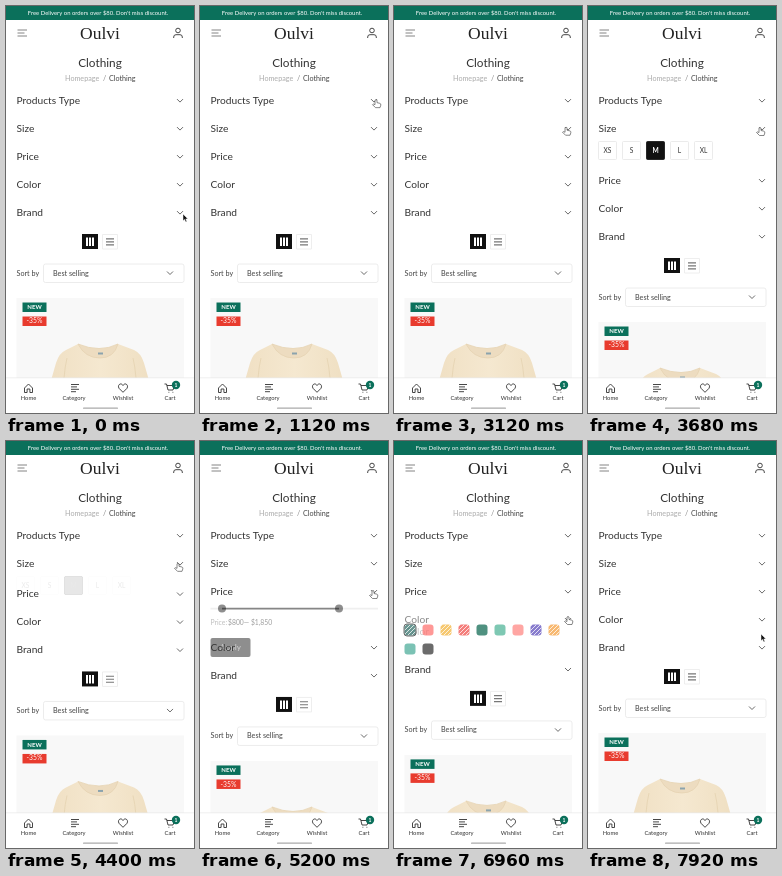
These frames come from a looping animation (188x407 px, 8000 ms). An HTML page with a canvas:

```html
<!DOCTYPE html>
<html lang="en">
<head>
<meta charset="utf-8">
<title>Shop filter</title>
<style>
html, body { margin: 0; width: 100%; height: 100%; overflow: hidden; background: #fff; }
canvas { display: block; width: 188px; height: 407px; }
</style>
</head>
<body>
<canvas id="stage"></canvas>
<script>
const LOOP = 8000, FADE = 400, W = 188, H = 407;
const GREEN = '#0b705b', INK = '#333', SANS = 'Lato, sans-serif';
const canvas = document.getElementById('stage');
const scale = window.devicePixelRatio || 1;
canvas.width = W * scale;
canvas.height = H * scale;
const c = canvas.getContext('2d');

const sections = [
  { name: 'Products Type', open: 1270, close: 2388, height: 113, draw: drawTypes },
  { name: 'Size', open: 3260, close: 4080, height: 24, draw: drawSizes },
  { name: 'Price', open: 5008, close: 5900, height: 59, draw: drawPrice },
  { name: 'Color', open: 6690, close: 7260, height: 29, draw: drawColors },
  { name: 'Brand' }
];
// time, x, y of the pointer
const pointerPath = [
  [0, 177, 208], [300, 177, 206], [1000, 176, 94], [1500, 176, 95], [2000, 175, 99],
  [2700, 175, 99], [3150, 172, 122], [4350, 172, 122], [4850, 173, 150],
  [6150, 173, 150], [6550, 174, 176], [7500, 174, 176], [7880, 173, 193], [8000, 173, 193]
];

const clamp = v => Math.max(0, Math.min(1, v));
const ease = v => { v = clamp(v); return v * v * (3 - 2 * v); };
const openness = (s, t) => s.open ? ease((t - s.open) / FADE) - ease((t - s.close) / FADE) : 0;

function text(str, x, y, size, color = INK, align = 'left', weight = 400, family = SANS) {
  c.font = `${weight} ${size}px ${family}`;
  c.textAlign = align;
  c.textBaseline = 'alphabetic';
  c.fillStyle = color;
  c.fillText(str, x, y + size * 0.35);
}
function rect(x, y, w, h, fill, radius = 0, stroke) {
  c.beginPath();
  c.roundRect(x, y, w, h, radius);
  if (fill) { c.fillStyle = fill; c.fill(); }
  if (stroke) { c.strokeStyle = stroke; c.lineWidth = 0.8; c.stroke(); }
}
function circle(x, y, r, fill) {
  c.beginPath();
  c.arc(x, y, r, 0, 7);
  c.fillStyle = fill;
  c.fill();
}
function path(d, x, y, stroke = INK, width = 0.9, fill) {
  const p = new Path2D(d);
  c.save();
  c.translate(x, y);
  if (fill) { c.fillStyle = fill; c.fill(p); }
  if (stroke) { c.strokeStyle = stroke; c.lineWidth = width; c.lineJoin = 'round'; c.stroke(p); }
  c.restore();
}
const chevron = (x, y) => path('M-3 -1.5L0 1.5L3 -1.5', x, y, '#444', 0.8);

function drawTypes(y) {
  const rows = { Bags: 112, Clothing: 32, Men: 42, Music: 13, Posters: 54, Shoes: 93 };
  Object.entries(rows).forEach(([name, count], i) => {
    text(name, 10.5, y + 22 + i * 18, 7.5, '#777');
    text(`(${count})`, 178, y + 22 + i * 18, 7.5, '#999', 'right');
  });
}

function drawSizes(y) {
  ['XS', 'S', 'M', 'L', 'XL'].forEach((name, i) => {
    const x = 10.5 + i * 24, chosen = name === 'M';
    rect(x, y + 12.5, 18, 18, chosen ? '#111' : '#fff', 1, chosen ? '#111' : '#e6e6e6');
    text(name, x + 9, y + 21.5, 6.6, chosen ? '#fff' : INK, 'center', chosen ? 700 : 400);
  });
}

function drawPrice(y) {
  rect(10.5, y + 15.8, 167.5, 1.6, '#ddd');
  rect(22, y + 15.8, 117, 1.6, '#111');
  circle(22, y + 16.6, 4, '#111');
  circle(139, y + 16.6, 4, '#111');
  text('Price:', 10.5, y + 30.5, 6.8, '#777');
  text('$800— $1,850', 28, y + 30.5, 6.8, INK);
  rect(10.5, y + 46, 40, 19, '#111', 2);
  text('Apply', 30.5, y + 55.5, 8, '#fff', 'center', 700);
}

function drawColors(y, amount) {
  c.save();
  c.globalAlpha *= 2 * amount * (1 - amount);
  text('Color', 10.5, y + 11, 10.2);
  c.restore();
  const colors = ['#39766f', '#ff7774', '#f3b642', '#f05450', '#176e57', '#54b69a', '#ff8985',
    '#6050bd', '#f6a244', '#50ae9c', '#3b3b3b'];
  colors.forEach((color, i) => {
    const x = 10.5 + (i % 9) * 18, top = y + 4.5 + Math.floor(i / 9) * 19;
    rect(x, top, 11, 11, color, 3);
    if ([0, 2, 3, 7, 8].includes(i)) {
      c.save();
      c.clip();
      for (let k = 2; k < 22; k += 4) path(`M${k - 11} 11L${k} 0`, x, top, '#fff', 1);
      c.restore();
    }
    if (!i) rect(x - 0.5, top - 0.5, 12, 12, null, 3, '#111');
  });
}

function drawHeader() {
  rect(0, 0, W, 14, GREEN);
  text("Free Delivery on orders over $80. Don't miss discount.", 92, 7, 5.9, '#fff', 'center');
  path('M0 0H9.5M0 3H7M0 6H9.5', 11.5, 24, '#666', 0.8);
  text('Oulvi', 94, 26.5, 17.5, '#222', 'center', 400, '"Liberation Serif", serif');
  path('M-2.3 -2.5a2.3 2.3 0 1 0 4.6 0a2.3 2.3 0 1 0 -4.6 0M-4.3 5V4Q-4.3 1.7 -2 1.7H2Q4.3 1.7 4.3 4V5', 172, 27);
  text('Clothing', 94, 57, 11.8, INK, 'center');
  text('Homepage', 59, 72, 7.2, '#aaa');
  text('/', 97, 72, 7.2, '#888');
  text('Clothing', 103, 72, 7.2, '#444');
}

function drawListing(shift, t) {
  c.save();
  c.translate(0, shift);
  rect(76, 228, 16, 15, '#111');
  for (let i = 0; i < 3; i++) rect(80 + i * 3, 231.5, 2, 8.5, '#fff');
  rect(96.5, 228.5, 15, 14.5, '#fff', 0, '#eaeaea');
  path('M0 0H8M0 3H8M0 6H8', 100, 232.8, '#777', 1.2);

  text('Sort by', 10.5, 267, 7.2, '#444');
  rect(37.5, 258, 140.5, 18.5, '#fff', 2, '#e8e8e8');
  text('Best selling', 47, 267, 7.2, '#444');
  chevron(164, 267);

  rect(10.5, 292, 167.5, 140, '#f8f8f8');
  const shirt = c.createLinearGradient(45, 0, 145, 0);
  shirt.addColorStop(0, '#f0e0c4');
  shirt.addColorStop(0.5, '#f5e8d0');
  shirt.addColorStop(1, '#efdfc2');
  path('M72 338Q94 347 112 338L128 344Q135 347 138 357L146 385V432H42V385L50 357Q53 347 60 344Z', 0, 0, null, 0, shirt);
  path('M72 338Q94 347 112 338Q108 352 94 352Q79 352 72 338Z', 0, 0, '#e6d4b3', 0.8, '#eddcc0');
  path('M61 352Q57 368 57 400M127 352Q131 368 131 400', 0, 0, '#e2d0ae', 0.7);
  rect(92, 346.5, 5, 2, '#8ba3ad');

  rect(16.5, 296.5, 24, 9.5, GREEN);
  text('NEW', 28.5, 301, 6, '#fff', 'center', 700);
  rect(16.5, 310.5, 24, 9.5, '#e83b2e');
  text('-35%', 28.5, 315 + 0.6 * Math.sin(t * Math.PI / 160), 6.8, '#fff', 'center');
  c.restore();
}

function drawNav() {
  rect(0, 372, W, 35, '#fff');
  rect(0, 371.5, W, 0.7, '#e9e9e9');
  path('M-4 0L0 -4L4 0V4.5H1.4V1H-1.4V4.5H-4Z', 22.5, 382);
  path('M0 0H8M0 2.4H6M0 4.8H8M0 7.2H5', 65, 378.5);
  path('M0 4.3L-4 0.3C-6 -3 -2 -6 0 -2.5C2 -6 6 -3 4 0.3Z', 117, 382);
  path('M-5 -4H-3L-1.5 2H3.5L5 -2.5H-2.5M-1 4.3h.8M3 4.3h.8', 163.5, 382);
  circle(170, 379, 4.2, GREEN);
  text('1', 170, 379, 5, '#fff', 'center', 700);
  [['Home', 22.5], ['Category', 68], ['Wishlist', 117], ['Cart', 164]].forEach(
    ([name, x]) => text(name, x, 392, 5.8, INK, 'center'));
  rect(77, 401.5, 35, 1.3, '#aaa', 0.6);
}

function drawPointer(t) {
  const i = pointerPath.findIndex((p, k) => k && t <= p[0]);
  const [t0, x0, y0] = pointerPath[i - 1], [t1, x1, y1] = pointerPath[i];
  const k = ease((t - t0) / (t1 - t0));
  const x = x0 + (x1 - x0) * k, y = y0 + (y1 - y0) * k;
  if (t > 850 && t < 7650)
    path('M-1 0Q0 -1 1 0V2.5L4 3.2Q5 3.5 4.8 5L4 7.5H-.5L-3.5 4.5Q-3 3.3 -1 4.5Z', x, y, '#555', 0.7, '#fff');
  else
    path('M0 0V6.8L1.6 5.4L2.7 8L3.9 7.4L2.8 4.9H5Z', x, y, '#fff', 0.5, '#111');
}

function draw(t) {
  c.setTransform(scale, 0, 0, scale, 0, 0);
  rect(0, 0, W, H, '#fff');
  drawHeader();
  let shift = 0;
  const rows = sections.map((s, i) => {
    const amount = openness(s, t), y = 95 + i * 28 + shift;
    shift += amount * (s.height || 0);
    return { s, y, amount };
  });
  drawListing(shift, t);
  for (const { s, y, amount } of rows) {
    if (amount <= 0) continue;
    c.save();
    c.globalAlpha = amount;
    s.draw(y, amount);
    c.restore();
  }
  for (const { s, y, amount } of rows) {
    const fading = s.name === 'Color' && amount > 0 && amount < 1;
    text(s.name, 10.5, y - 0.8, 10.2, fading ? '#888' : INK);
    chevron(174, y - 0.4);
  }
  drawNav();
  drawPointer(t);
}

function tick() {
  draw(performance.now() % LOOP);
  requestAnimationFrame(tick);
}
tick();
</script>
</body>
</html>
```
